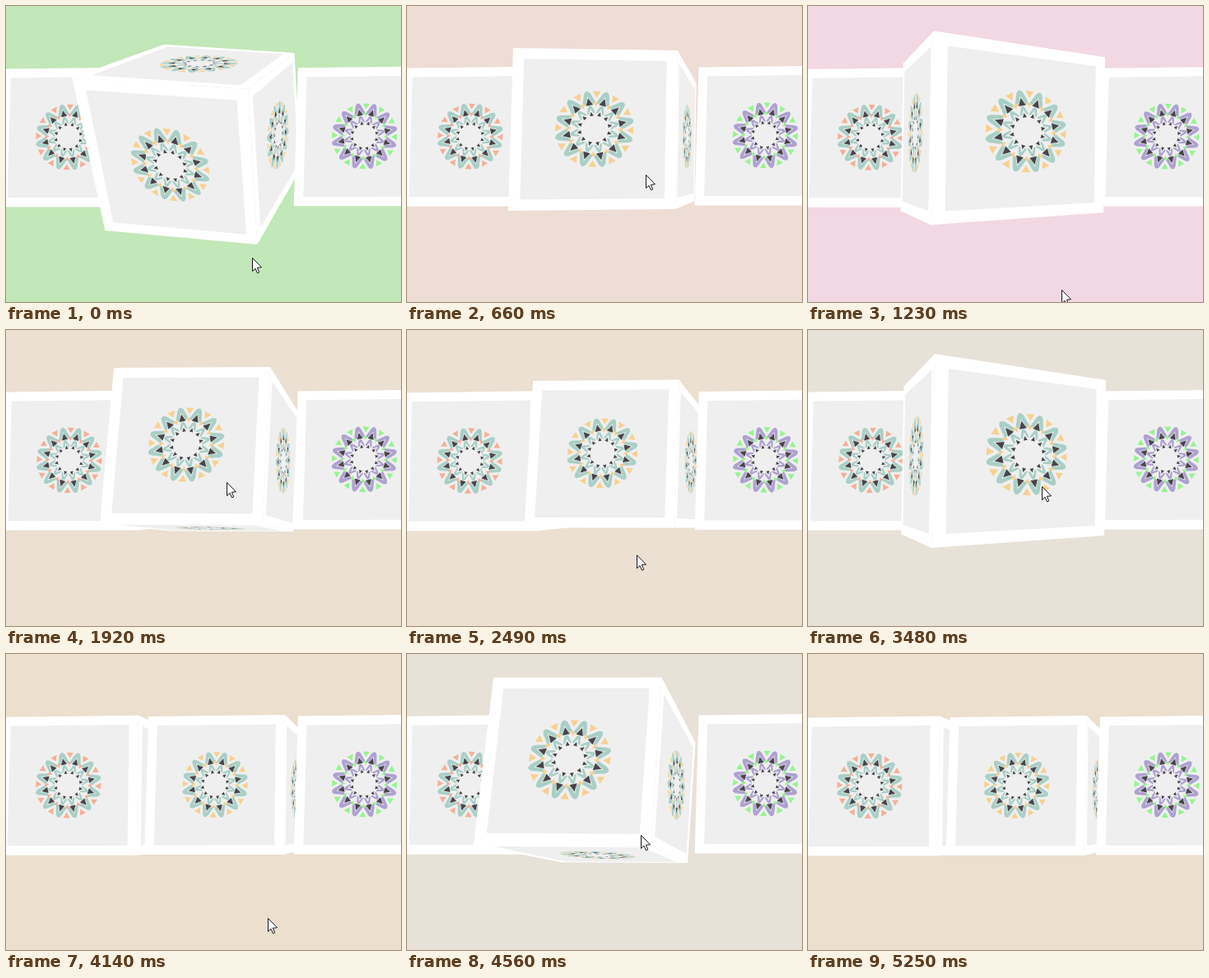
Recreate the animation shown at these times as an HTML page with a canvas. Size 480 px wide and 360 px high, loop 6.33 s.

```html
<!DOCTYPE html>
<html lang="en">
<head>
<meta charset="utf-8">
<title>Tilting cubes</title>
<style>
html, body { margin: 0; width: 100%; height: 100%; overflow: hidden; background: #ecdfce; }
canvas { display: block; width: 480px; height: 360px; }
</style>
</head>
<body>
<canvas id="stage" width="480" height="360"></canvas>
<script>
const ctx = document.getElementById('stage').getContext('2d');

// The picture advances in ticks and rests on the last one.
const LOOP = 6330, TICK = 138.2, LEAD = 45, LAST_TICK = 38;

const lerp = (a, b, k) => a + (b - a) * k;
const mix = (a, b, k) => a.map((v, i) => lerp(v, b[i], k));
const rgb = hex => [1, 3, 5].map(i => parseInt(hex.slice(i, i + 2), 16));

// Front corners TL TR BR BL, vanishing point, depth towards it.
const REST = [174, 75, 340, 73, 338, 243, 169, 243, 477, 210, .19];
const RISE = [129, 51, 329, 54, 326, 247, 123, 249, 416, 209, .26];
const TURN = [154, 29, 362, 61, 360, 250, 150, 265, -3, 195, .24];
const HIGH = [131, 46, 321, 45, 312, 237, 114, 236, 462, 270, .25];
const LOW = [81, 86, 295, 100, 306, 289, 121, 272, 510, -68, .26];
const PEAK = mix(REST, HIGH, 1.6);

const BASE = rgb('#ecdfce');
const GREEN = rgb('#c2e7b8'), PINK = rgb('#f2d8e2'), SAND = rgb('#e8e1d8');

const VISITS = [
  { start: -5, leave: 0, enter: RISE, peak: LOW, color: GREEN },
  { start: 4, leave: 9, enter: RISE, peak: TURN, color: PINK },
  { start: 13, leave: 17, enter: HIGH, peak: PEAK, color: SAND },
  { start: 22, leave: 26, enter: RISE, peak: TURN, color: SAND },
  { start: 30, leave: 34, enter: HIGH, peak: PEAK, color: SAND }
];

// Tick, x, y
const CURSOR = [[0, 299, 306], [3, 300, 327], [5, 290, 205], [8, 290, 192], [9, 308, 345], [11, 312, 400],
  [14, 268, 185], [16, 261, 172], [19, 288, 324], [20, 292, 332], [22, 282, 221], [25, 284, 190],
  [27, 306, 316], [30, 318, 321], [33, 284, 220], [35, 300, 326], [38, 306, 420]];

function cursorAt(tick) {
  const i = Math.max(1, CURSOR.findIndex(key => key[0] >= tick));
  const [t0, ...a] = CURSOR[i - 1], [t1, ...b] = CURSOR[i];
  return mix(a, b, (tick - t0) / (t1 - t0));
}

// Rise in one tick, reach the peak two later, then settle with an ease-out.
function sceneAt(tick) {
  const { start, leave, enter, peak, color } = VISITS.filter(v => v.start <= tick).pop();
  const age = tick - start;
  if (tick > leave) {
    const left = Math.max(0, 1 - (tick - leave) / 3) ** 3;
    return { pose: mix(REST, peak, left), back: mix(BASE, color, left) };
  }
  const pose = age < 1 ? mix(REST, enter, age) : mix(enter, peak, Math.min(1, (age - 1) / 2));
  return { pose, back: mix(BASE, color, Math.min(1, age / 3)) };
}

// Projective map from the unit square to a quad.
function project([[x0, y0], [x1, y1], [x2, y2], [x3, y3]]) {
  const ax = x1 - x2, ay = y1 - y2, bx = x3 - x2, by = y3 - y2;
  const sx = x0 - x1 + x2 - x3, sy = y0 - y1 + y2 - y3;
  const den = ax * by - bx * ay;
  const g = (sx * by - bx * sy) / den, h = (ax * sy - sx * ay) / den;
  return (u, v) => {
    const w = g * u + h * v + 1;
    return [((x1 - x0 + g * x1) * u + (x3 - x0 + h * x3) * v + x0) / w,
            ((y1 - y0 + g * y1) * u + (y3 - y0 + h * y3) * v + y0) / w];
  };
}

function fill(points, color) {
  ctx.beginPath();
  points.forEach(p => ctx.lineTo(...p));
  ctx.closePath();
  ctx.fillStyle = color;
  ctx.fill();
}

// Shapes as [radius, sideways] pairs, mirrored about the radius.
const mirror = half => [...half, ...half.map(([r, q]) => [r, -q]).reverse()];
const PETAL = mirror([[.87, 0], [.66, .085], [.64, .15], [.7, .16], [.94, .08], [1, .03]]);
const triangle = (tip, base, half) => [[tip, 0], [base, half], [base, -half]];
const SPIKE = triangle(.82, .63, .09);
const WEDGE = triangle(.81, .98, .1);
const PETALS = 12, RADIUS = .24, DARK = '#494449';

function mandala(map, [line, accent]) {
  const shape = (points, angle, scale, color) => {
    const c = Math.cos(angle) * RADIUS * scale, s = Math.sin(angle) * RADIUS * scale;
    fill(points.map(([r, q]) => map(.5 + r * c - q * s, .5 + r * s + q * c)), color);
  };
  for (let i = 0; i < PETALS; i++) {
    const angle = (i * 360 / PETALS - 103) * Math.PI / 180, between = angle + Math.PI / PETALS;
    shape(PETAL, angle, 1, line);
    shape(SPIKE, angle, 1, DARK);
    shape(WEDGE, between, 1, accent);
    shape(WEDGE, between, .72, accent);
    shape(PETAL, angle, .62, line);
    shape(SPIKE, angle, .55, DARK);
  }
}

function face(quad, colors) {
  const [a, b, c, d] = quad;
  const facing = (c[0] - a[0]) * (d[1] - b[1]) - (c[1] - a[1]) * (d[0] - b[0]);
  if (facing < 1) return;
  const map = project(quad), m = .067;
  fill(quad, '#fff');
  fill([map(m, m), map(1 - m, m), map(1 - m, 1 - m), map(m, 1 - m)], '#efefef');
  mandala(map, colors);
}

// Four front corners, then the same four drawn towards the vanishing point.
function cube(pose, dx, dy) {
  const vanish = pose.slice(8, 10), depth = pose[10];
  const front = [0, 2, 4, 6].map(i => [pose[i] + dx, pose[i + 1] + dy]);
  return [...front, ...front.map(p => mix(p, vanish, depth))];
}

const SIDES = { front: [0, 1, 2, 3], right: [1, 5, 6, 2], left: [4, 0, 3, 7], top: [4, 5, 1, 0], bottom: [3, 2, 6, 7] };
const side = (corners, name, colors) => face(SIDES[name].map(i => corners[i]), colors);

function cursor(x, y) {
  const arrow = [[0, 0], [0, 16], [3.6, 12.8], [6, 18.4], [8.2, 17.4], [5.9, 11.8], [11, 11.3]];
  fill(arrow.map(([u, v]) => [x + u + .5, y + v + .5]), '#fff');
  ctx.strokeStyle = '#15151f';
  ctx.lineWidth = 1;
  ctx.stroke();
}

const TEAL = '#a9cfc6';
const CORAL = [TEAL, '#f5af97'], GOLD = [TEAL, '#f8d08f'], LIME = ['#aea2d0', '#94f58e'];

function draw(tick) {
  const { pose, back } = sceneAt(tick);
  const [x, y] = cursorAt(tick);
  const drift = Math.max(0, Math.min(2, (y - 200) / 110));
  const middle = cube(pose, -.7 * drift, drift);
  const left = cube(REST, -178 - drift, drift + .6);
  const right = cube(REST, 180.5 + .3 * drift, drift - .6);

  ctx.fillStyle = `rgb(${back.map(Math.round)})`;
  ctx.fillRect(0, 0, 480, 360);
  side(middle, 'right', GOLD);
  side(left, 'right', CORAL);
  side(left, 'front', CORAL);
  side(right, 'front', LIME);
  for (const name of ['left', 'top', 'bottom', 'front']) side(middle, name, GOLD);
  cursor(x, y);
}

function frame() {
  const now = performance.now() % LOOP;
  draw(Math.min(LAST_TICK, Math.floor((now + LEAD) / TICK)));
  requestAnimationFrame(frame);
}
frame();
</script>
</body>
</html>
```
